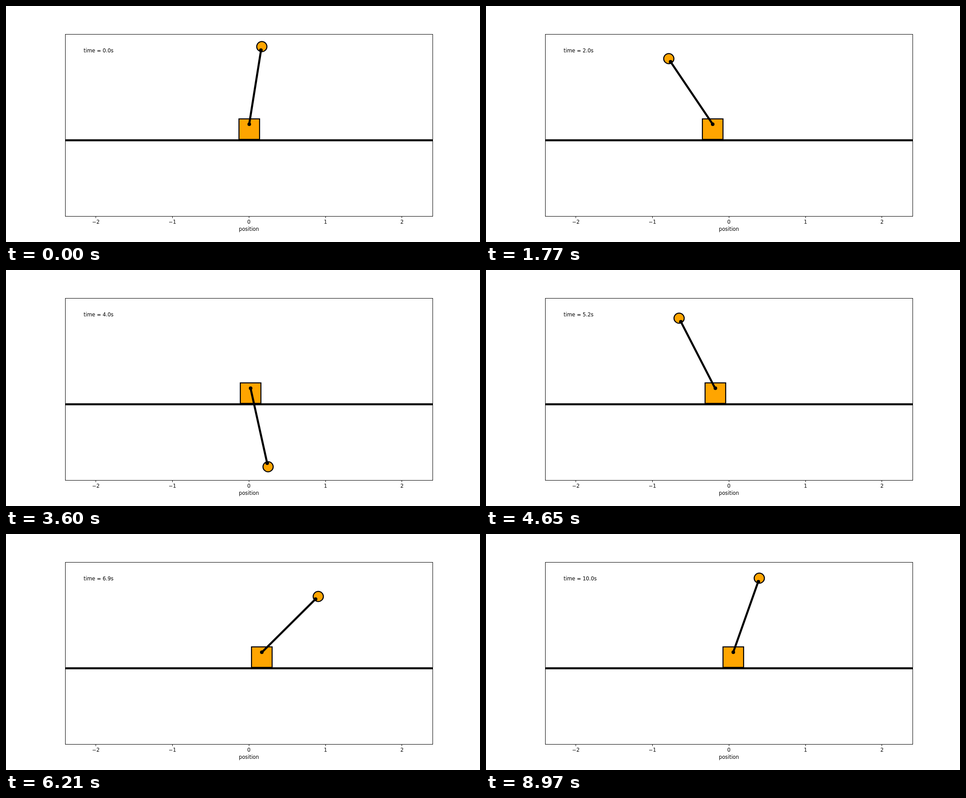
An HTML page with a canvas that plays this animation: 1058x529 px, repeating every 9 s.

```html
<!DOCTYPE html>
<html lang="en">
<head>
<meta charset="utf-8">
<title>Cart and pendulum</title>
<style>
  html, body { margin: 0; width: 100%; height: 100%; overflow: hidden; background: #fff; }
  canvas { display: block; }
</style>
</head>
<body>
<canvas id="stage" width="1058" height="529"></canvas>
<script>
const ctx = document.getElementById('stage').getContext('2d');
const LOOP = 9000, STEP = 30, LAST = 299, SIM_SECONDS = 10;
const PT = 1.14; // pixels per point
const BOX = { left: 132.5, top: 63.5, right: 952.5, bottom: 471.5 };
const px = x => 542.225 + x * 170.82;
const py = y => 267.15 - y * 169.72;

// Pendulum on a free cart: angle is measured from upright.
const TURN = 8.7 * Math.PI / 180; // angle where the swing reverses
const HALF = 1.629;               // seconds from one reversal to the next
const LEAD = 0.039;               // seconds already swung at the start
const PULL = 16.57, COUPLING = 0.45;

// Angles over a quarter swing, from the turning point down to the bottom.
const quarter = (() => {
  const h = 0.0002, list = [];
  let a = TURN, v = 0;
  while (a < Math.PI) {
    list.push(a);
    const s = Math.sin(a), c = Math.cos(a);
    v += h * s * (PULL - COUPLING * c * v * v) / (1 - COUPLING * c * c);
    a += h * v;
  }
  list.push(Math.PI);
  return list;
})();

function angleAt(t) {
  const p = (t + LEAD) / HALF, n = Math.floor(p), f = p - n;
  const down = f < 0.5;
  const at = (down ? 2 * f : 2 - 2 * f) * (quarter.length - 1);
  const i = Math.min(Math.floor(at), quarter.length - 2);
  const a = quarter[i] + (quarter[i + 1] - quarter[i]) * (at - i);
  return down === (n % 2 === 0) ? a : -a;
}

function line(x1, y1, x2, y2, width) {
  ctx.lineWidth = width;
  ctx.beginPath();
  ctx.moveTo(x1, y1);
  ctx.lineTo(x2, y2);
  ctx.stroke();
}

function disc(x, y, r, fill, edge) {
  ctx.beginPath();
  ctx.arc(Math.round(x), Math.round(y), r, 0, 2 * Math.PI);
  ctx.fillStyle = fill;
  ctx.fill();
  ctx.lineWidth = edge;
  ctx.stroke();
}

function label(text, x, y, align) {
  ctx.fillStyle = '#000';
  ctx.textAlign = align;
  ctx.fillText(text, x, y);
}

function drawAxes() {
  ctx.lineWidth = 1;
  ctx.strokeRect(BOX.left, BOX.top, BOX.right - BOX.left, BOX.bottom - BOX.top);
  for (let i = -2; i <= 2; i++) {
    const x = Math.floor(px(i)) + 0.5;
    line(x, BOX.bottom, x, BOX.bottom + 4, 1);
    label(String(i).replace('-', '\u2212'), px(i), 488, 'center');
  }
  label('position', px(0), 504, 'center');
}

function drawCart(t) {
  const a = angleAt(t), s = Math.sin(a), c = Math.cos(a);
  const x = 0.302 * s - 0.0435;
  const cx = Math.round(px(x)), cy = Math.round(py(-0.05));

  ctx.fillStyle = 'orange';
  ctx.fillRect(cx - 23, cy - 23, 46, 46);
  ctx.lineWidth = 2 * PT;
  ctx.strokeRect(cx - 23, cy - 23, 46, 46);
  line(BOX.left, 301, BOX.right, 301, 4 * PT);

  disc(px(x + 1.05 * s), py(1.05 * c), 10 * PT, 'orange', 2 * PT);
  const ends = [[px(x), py(0.01)], [px(x + s), py(c)]];
  line(...ends[0], ...ends[1], 4 * PT);
  for (const [ex, ey] of ends) disc(ex, ey, 3 * PT, '#000', PT);
}

function draw(now) {
  const frame = Math.floor((now % LOOP) / STEP);
  const t = frame * SIM_SECONDS / LAST;
  ctx.fillStyle = '#fff';
  ctx.fillRect(0, 0, 1058, 529);
  ctx.strokeStyle = '#000';
  ctx.font = '11.4px "DejaVu Sans", sans-serif';
  drawCart(t);
  drawAxes();
  label('time = ' + t.toFixed(1) + 's', 173.3, 104, 'left');
  requestAnimationFrame(draw);
}
draw(performance.now());
</script>
</body>
</html>
```
